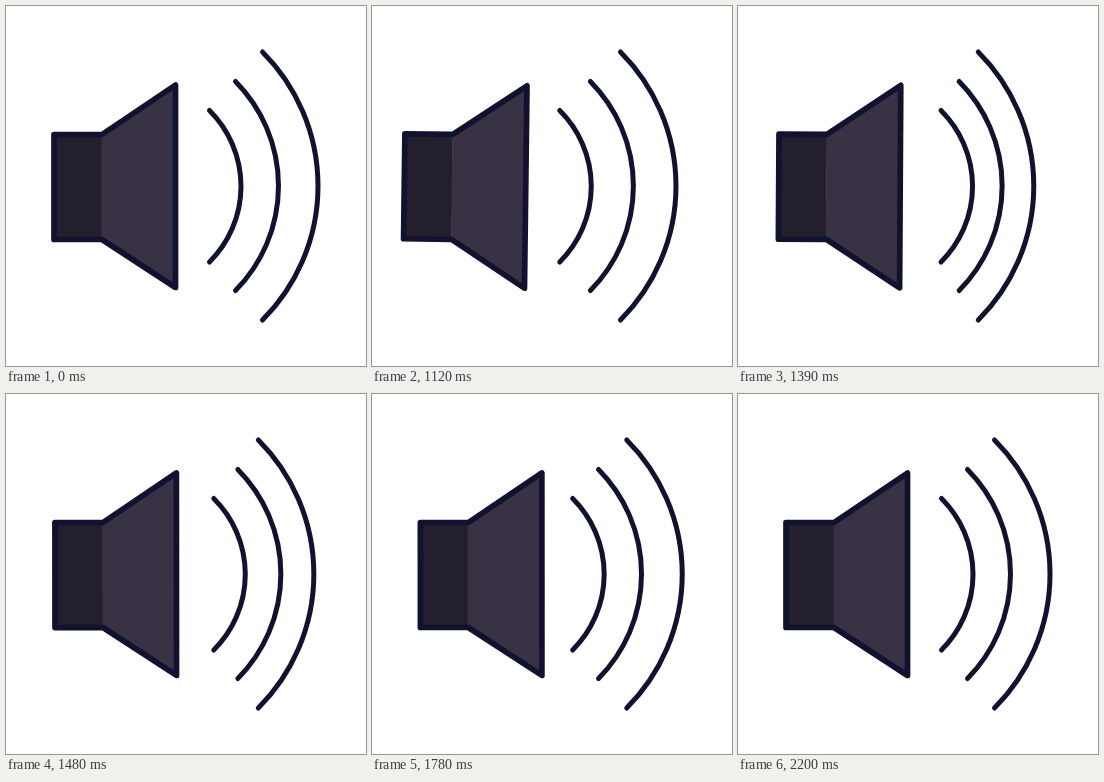
Animation, 360 px wide and 360 px high, one loop 2.23 s. Source, as an HTML page:

```html
<!DOCTYPE html>
<html lang="en">
<head>
<meta charset="utf-8">
<title>Speaker</title>
<style>
  html, body { margin: 0; height: 100%; overflow: hidden; background: #fff; }
  svg { display: block; width: 100vw; height: 100vh; }
  .line { fill: none; stroke: #11122f; stroke-width: 5; stroke-linecap: round; stroke-linejoin: round; }
  #speaker .line { stroke-width: 5.7; }
</style>
</head>
<body>
<svg viewBox="0 0 360 360">
  <g id="speaker">
    <path fill="#231f2c" d="M48 128.5H96V233.5H48Z"/>
    <path fill="#393245" d="M95.5 128.5L169.5 79V281.5L95.5 233.5Z"/>
    <path class="line" d="M48 128.5H96L169.5 79V281.5L96 233.5H48Z"/>
  </g>
  <path class="line wave" d="M203.5 104.5A106.8 106.8 0 0 1 203.5 256"/>
  <path class="line wave" d="M229.5 75.5A148.5 148.5 0 0 1 229.5 284.5"/>
  <path class="line wave" d="M256.5 46A189.5 189.5 0 0 1 256.5 314"/>
</svg>
<script>
const LOOP = 2230, START = 1030, STEP = 30;
const PULL = 980, TURN = 1190, STAGGER = 60;
const speaker = document.getElementById('speaker');
const waves = document.querySelectorAll('.wave');

const clamp = (v, min, max) => Math.min(max, Math.max(min, v));

// Sine ease from 0 to 1 between two times.
const ease = (t, from, to) =>
  (1 - Math.cos(Math.PI * clamp((t - from) / (to - from), 0, 1))) / 2;

// Pull back until `turn`, shoot forward, fall back by `dip`, settle at 0.
function recoil(t, turn, rise, dip) {
  if (t < START) return 0;
  const peak = turn + rise, low = peak + 260;
  return -21 * ease(t, PULL, turn) + 25.3 * ease(t, turn, peak)
    - (4.3 + dip) * ease(t, peak, low) + dip * ease(t, low, low + 330);
}

// Blink out just before `turn` and back in after it.
function blink(t, turn) {
  const d = t - turn + 10;
  return clamp(d < 0 ? -d / 60 : d / 90, 0.04, 1);
}

function draw(now) {
  const t = START + Math.floor((now % LOOP - START) / STEP) * STEP;
  const x = recoil(t, TURN, 380, 0);
  speaker.setAttribute('transform', `translate(${x}) rotate(${-x * 0.045} 108 180)`);
  waves.forEach((wave, i) => {
    const turn = TURN + STAGGER * i;
    wave.setAttribute('transform', `translate(${recoil(t, turn, 280, 3)})`);
    wave.setAttribute('opacity', blink(t, turn));
  });
  requestAnimationFrame(draw);
}
draw(0);
</script>
</body>
</html>
```
